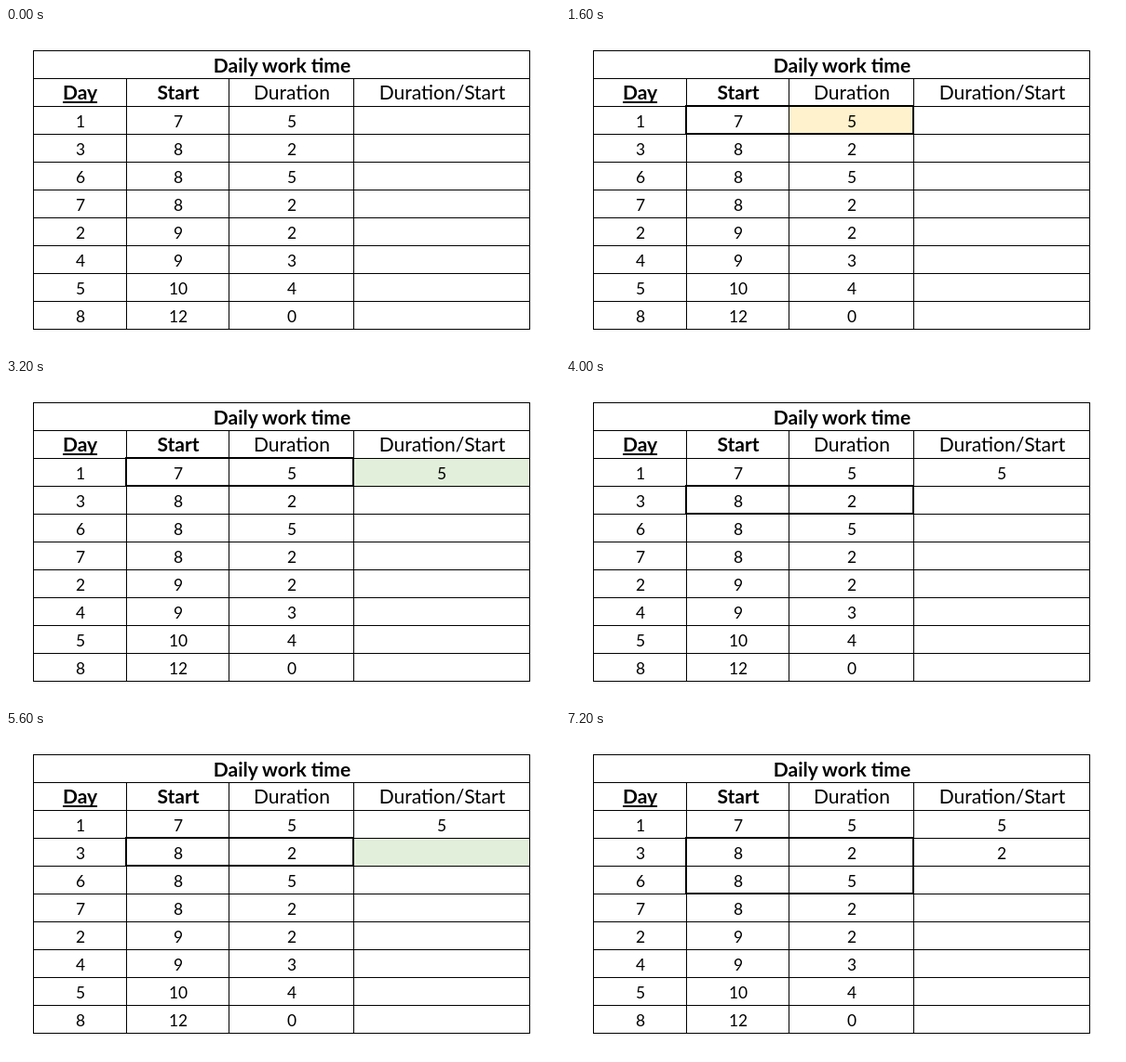
Write an HTML page that moves like this. It is 595x349 px and loops after 8 s.

```html
<!DOCTYPE html>
<html lang="en">
<head>
<meta charset="utf-8">
<title>Daily work time</title>
<style>
  html, body { margin: 0; height: 100%; overflow: hidden; background: #fff; }
  svg { display: block; }
  text { font: 17.4px Carlito, Lato, sans-serif; text-anchor: middle; }
  .head { font-size: 21px; }
  .bold { font-weight: bold; }
  .grid, #box { fill: none; stroke: #000; }
  #box { stroke-width: 2; }
</style>
</head>
<body>
<svg id="stage" width="595" height="349" viewBox="0 0 595 349"></svg>
<script>
const STEP = 800, STEPS = 10, ROW = 30, TOP = 84;
const cols = [29, 129, 239, 373, 562];
const centers = [80, 185, 307, 468.5];
const rows = [[1, 7, 5], [3, 8, 2], [6, 8, 5], [7, 8, 2], [2, 9, 2], [4, 9, 3], [5, 10, 4], [8, 12, 0]];
const stage = document.getElementById("stage");

function add(tag, attrs, content = "") {
  const el = document.createElementNS("http://www.w3.org/2000/svg", tag);
  for (const name in attrs) el.setAttribute(name, attrs[name]);
  el.textContent = content;
  return stage.appendChild(el);
}
const label = (x, y, content, cls = "") => add("text", { x, y, class: cls }, content);
const show = (el, on) => el.setAttribute("visibility", on ? "visible" : "hidden");

const yellow = add("rect", { x: 240, width: 133, height: 29, fill: "#fff2cc" });
const green = add("rect", { x: 374, width: 188, height: 29, fill: "#e2efda" });

// Table lines run through pixel centres
let lines = "";
for (let y = 24; y <= 324; y += ROW) lines += `M29 ${y + .5}H563`;
cols.forEach((x, i) => lines += `M${x + .5} ${i % 4 ? 54 : 24}V325`);
add("path", { d: lines, class: "grid" });
const box = add("rect", { id: "box", x: 129, width: 244 });

label(296.5, 48, "Daily work time", "head bold");
["Day", "Start", "Duration", "Duration/Start"].forEach((name, i) =>
  label(i ? centers[i] : 79.5, 77, name, i < 2 ? "head bold" : "head"));
add("rect", { x: 61, y: 79, width: 37, height: 2 });
rows.forEach((row, r) => row.forEach((value, c) => label(centers[c], 107 + r * ROW, value)));
const results = [0, 1].map(r => label(468, 107 + r * ROW, rows[r][2]));

// Each row takes four steps: outline, duration, target cell, result
function draw(now) {
  const step = Math.floor(now / STEP) % STEPS;
  const phase = (step + 3) % 4;
  const row = step > 4 ? 1 : 0;
  const last = step === STEPS - 1;
  const y = TOP + row * ROW;
  show(box, step > 0);
  box.setAttribute("y", y);
  box.setAttribute("height", last ? 2 * ROW : ROW);
  yellow.setAttribute("y", y + 1);
  green.setAttribute("y", y + 1);
  show(yellow, step > 0 && phase === 1);
  show(green, step > 0 && phase > 1);
  results.forEach((el, r) => show(el, step >= 4 + 4 * r));
  requestAnimationFrame(draw);
}
draw(performance.now());
</script>
</body>
</html>
```
